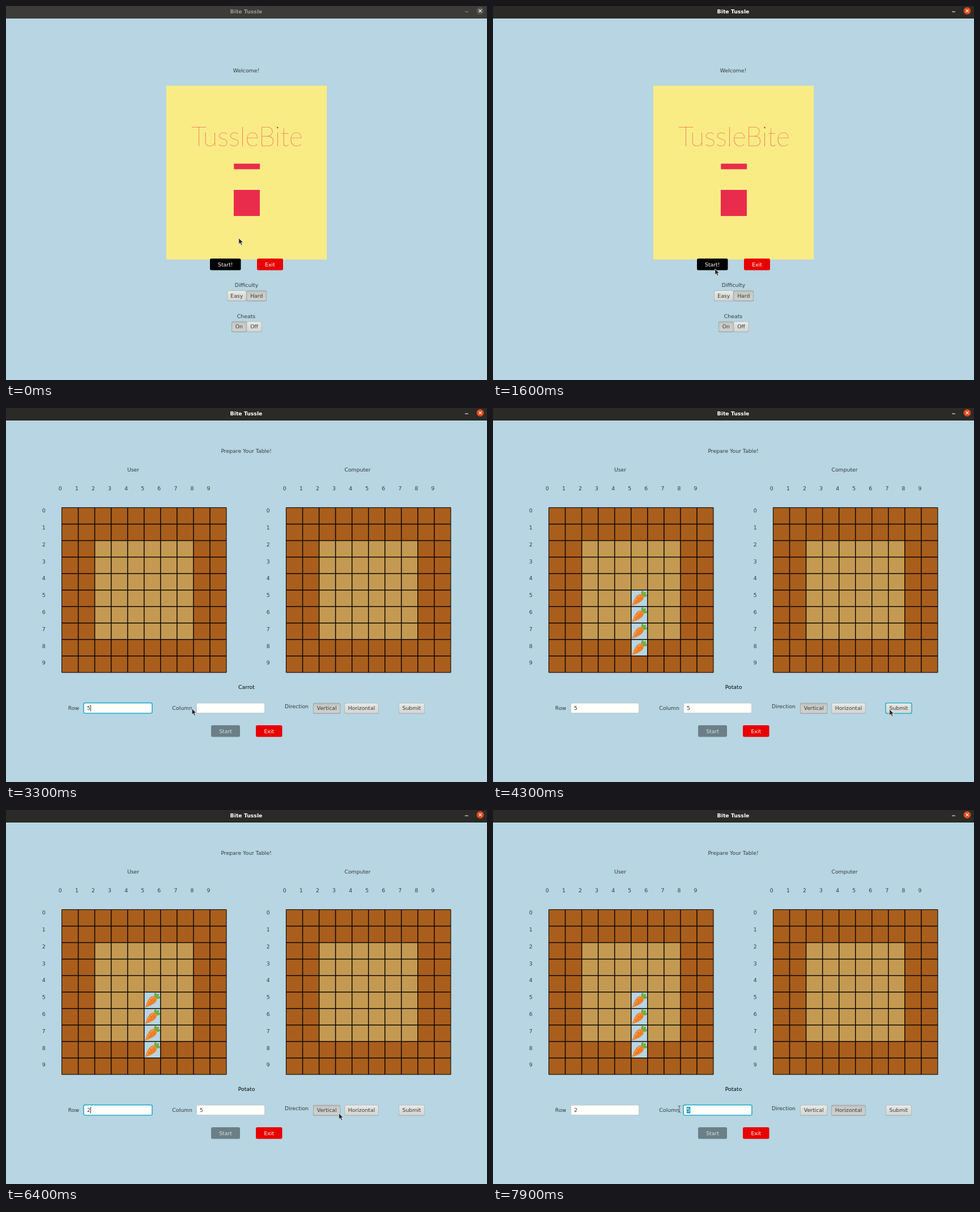
An HTML page with a canvas that plays this animation: 849 px wide and 659 px high, repeating every 8 s.

```html
<!DOCTYPE html>
<html lang="en">
<head>
<meta charset="utf-8">
<title>Bite Tussle</title>
<style>
html, body { margin: 0; width: 100%; height: 100%; overflow: hidden; background: #b7d5e2; }
canvas { display: block; }
</style>
</head>
<body>
<canvas id="stage" width="849" height="659"></canvas>
<script>
const ctx = document.getElementById('stage').getContext('2d');
const LOOP = 8000, STEP = 100;
const SKY = '#b7d5e2', INK = '#363a3c', PINK = '#ea2c4c', FOCUS = '#2cb0cf';
const FONT = "9.3px 'DejaVu Sans', sans-serif";

// Moments at which the state of the window changes
const TABLE = 1900, TYPE_ROW = 2900, TO_COLUMN = 3500, TYPE_COLUMN = 3700, SUBMIT = 4300,
      BACK_TO_ROW = 5000, RETYPE_ROW = 5400, HORIZONTAL = 6800, SELECT_COLUMN = 7600;

// Pointer route: time, x, y
const route = [
  [600, 410, 408], [800, 419, 452], [1000, 433, 508], [1200, 393, 471], [1300, 393, 471], [1600, 391, 462],
  [2100, 391, 462], [2400, 300, 510], [2600, 222, 528], [3100, 222, 528], [3400, 380, 529], [3700, 386, 530],
  [4000, 600, 538], [4200, 699, 530], [4500, 699, 530], [4900, 222, 530], [5200, 114, 528],
  [5500, 297, 528], [5800, 345, 532], [6300, 560, 534], [6600, 640, 532], [6800, 640, 532],
  [7100, 727, 529], [7300, 727, 529], [7600, 400, 530], [7900, 329, 527]
];

const mix = (a, b, p) => a + (b - a) * p;
const blend = (a, b, p) => `rgb(${a.map((v, i) => Math.round(mix(v, b[i], p)))})`;

function pointerAt(t) {
  const next = route.findIndex(k => k[0] > t);
  if (next === 0) return route[0].slice(1);
  if (next < 0) return route[route.length - 1].slice(1);
  const [t0, x0, y0] = route[next - 1], [t1, x1, y1] = route[next];
  const p = (t - t0) / (t1 - t0);
  return [mix(x0, x1, p), mix(y0, y1, p)];
}

function rect(x, y, w, h, fill) {
  ctx.fillStyle = fill;
  ctx.fillRect(x, y, w, h);
}

function box(x, y, w, h, r, fill) {
  ctx.beginPath();
  ctx.roundRect(x, y, w, h, r);
  ctx.fillStyle = fill;
  ctx.fill();
}

function shape(path, fill, stroke, width = 1) {
  const p = new Path2D(path);
  if (fill) { ctx.fillStyle = fill; ctx.fill(p); }
  if (stroke) { ctx.strokeStyle = stroke; ctx.lineWidth = width; ctx.stroke(p); }
}

function label(text, x, y, color = INK, align = 'center', font = FONT) {
  ctx.font = font;
  ctx.textAlign = align;
  ctx.fillStyle = color;
  ctx.fillText(text, x, y + 3.4);
}

function flatButton(text, x, y, w, fill, color = '#fff') {
  box(x, y, w, 20.5, 2.5, fill);
  label(text, x + w / 2, y + 10.2, color);
}

function button(text, x, y, w, { on = false, focus = false } = {}) {
  const h = 18.5, shade = ctx.createLinearGradient(0, y, 0, y + h);
  const stops = on ? ['#b4b6b3', '#c9cbc7', '#cfd0cc'] : ['#eeefeb', '#e2e3df', '#d5d6d2'];
  stops.forEach((c, i) => shade.addColorStop([0, 0.25, 1][i], c));
  if (focus) box(x - 0.8, y - 0.8, w + 1.6, h + 1.6, 3, FOCUS);
  else box(x, y, w, h + 0.5, 2.5, on ? '#96a0a4' : '#a9b4b8');
  box(x + 0.8, y + 0.8, w - 1.6, h - 1.6, 2, shade);
  label(text, x + w / 2, y + 9.1);
}

function field(text, x, focus, selected) {
  const y = 519.5, tx = x + 6.3;
  if (focus) box(x - 0.8, y - 0.8, 122.6, 19.8, 3, FOCUS);
  else box(x, y, 121, 18.4, 2.5, '#bfc9cc');
  box(x + 0.9, y + 0.9, 119.2, 16.6, 1.5, '#fffffc');
  if (selected) rect(tx - 0.5, 523, 6.5, 11.5, '#1d99bd');
  label(text, tx - 0.2, 529, selected ? '#fff' : INK, 'left');
  if (focus && !selected) rect(tx + (text ? 5.7 : 0), 523, 0.9, 11.5, '#222');
}

function titleBar(p) {
  rect(0, 0, 849, 22, blend([61, 60, 56], [43, 42, 38], p));
  rect(0, 21, 849, 1, blend([50, 49, 46], [33, 32, 29], p));
  const text = blend([152, 151, 145], [255, 255, 255], p);
  label('Bite Tussle', 424, 9.2, text, 'center', "bold 9.3px 'DejaVu Sans', sans-serif");
  rect(810, 9.6, 6, 1, text);
  ctx.beginPath();
  ctx.arc(837, 8.5, 6.5, 0, 7);
  ctx.fillStyle = blend([86, 85, 80], [222, 70, 26], p);
  ctx.fill();
  shape('M834.5 6l5 5m0-5l-5 5', null, '#f4f4f2', 1.1);
}

function wordmark(text, cx, cy, width) {
  const face = size => `100 ${size}px Lato, Inter, sans-serif`;
  ctx.font = face(60);
  const size = Math.min(60, 60 * width / ctx.measureText(text).width);
  ctx.font = face(size);
  ctx.textAlign = 'center';
  ctx.fillStyle = PINK;
  ctx.fillText(text, cx, cy + size * 0.36);
}

function welcome() {
  label('Welcome!', 424, 113.7);
  rect(282.8, 140.3, 283.4, 306.4, '#faec85');
  wordmark('TussleBite', 425.5, 230, 197);
  rect(402.3, 277.8, 45.8, 9.8, PINK);
  rect(402, 324, 46, 46, PINK);
  flatButton('Start!', 360, 445, 54.5, '#000');
  flatButton('Exit', 443, 445, 46, '#e80000');
  label('Difficulty', 424.5, 492);
  button('Easy', 390, 501.3, 34.5);
  button('Hard', 424.5, 501.3, 35.5, { on: true });
  label('Cheats', 424, 546.7);
  button('On', 398, 555.8, 26.5, { on: true });
  button('Off', 424.5, 555.8, 27);
}

const CELL = 29.05, GRID_Y = 175.5;

function board(name, x) {
  label(name, x + 126, 108.7);
  for (let i = 0; i < 10; i++) {
    label(i, x - 2.7 + i * 29.08, 141.3);
    label(i, x - 31.7, 181 + i * 29.77);
  }
  rect(x, GRID_Y, CELL * 10, CELL * 10, '#a95e1c');
  rect(x + CELL * 2, GRID_Y + CELL * 2, CELL * 6, CELL * 6, '#c49a52');
}

function gridLines(x) {
  for (let i = 0; i <= 10; i++) {
    const d = i * CELL, w = i % 10 ? 1.5 : 1.1;
    rect(x + d - w / 2, GRID_Y, w, CELL * 10, '#0b0704');
    rect(x, GRID_Y + d - w / 2, CELL * 10, w, '#0b0704');
  }
}

function carrot(x, y) {
  rect(x, y, CELL, CELL, SKY);
  ctx.save();
  ctx.translate(x, y);
  shape('M19 10C17 5 18 2 20 1.5C22 1 22 4 22 6C23 3 25 2 26 4C27 6 25 7 25 8C28 7 29 9 27.5 11C25 13 21 12 19 10Z', '#6da32f');
  shape('M19.5 10L20.5 4M20 10L25 5M20.5 10.5L26 10', null, '#93c04b', 0.9);
  shape('M1.6 27.4C4 20 8 10 14 7.5C18 6 23 10 22 14.5C21 20 9 25.5 1.6 27.4Z', '#f0822a');
  shape('M4 24.5C8 17 12 11 16 9', null, '#f9a75a', 1.3);
  shape('M10 13l3.5 2M6.5 19l3 1.6M14 20l-2.5-2M19.5 16l-3-2', null, '#cf6418', 0.8);
  ctx.restore();
}

function table(t) {
  const left = 98.5, right = 494.5, placed = t >= SUBMIT;
  const inRow = t < TO_COLUMN || (t >= BACK_TO_ROW && t < HORIZONTAL);
  const inColumn = (t >= TO_COLUMN && t < SUBMIT) || t >= SELECT_COLUMN;
  const flat = t >= HORIZONTAL;
  label('Prepare Your Table!', 424, 76);
  board('User', left);
  board('Computer', right);
  if (placed) for (let row = 5; row < 9; row++) carrot(left + 5 * CELL, GRID_Y + row * CELL);
  gridLines(left);
  gridLines(right);
  label(placed ? 'Potato' : 'Carrot', 424.5, 492, '#000');

  label('Row', 119.5, 529);
  field(t < TYPE_ROW ? '' : t < RETYPE_ROW ? '5' : '2', 137, inRow, t > BACK_TO_ROW && t < RETYPE_ROW);
  label('Column', 311, 529);
  field(t < TYPE_COLUMN ? '' : '5', 336, inColumn, t >= SELECT_COLUMN);
  label('Direction', 513, 525.4);
  button('Vertical', 542, 519.8, 48.3, { on: !flat });
  button('Horizontal', 597.3, 519.8, 60.4, { on: flat, focus: flat && t < SELECT_COLUMN });
  button('Submit', 693, 519.8, 46, { focus: placed && t < BACK_TO_ROW });
  flatButton('Start', 362, 559, 51, '#6c7f87', '#d3dfe4');
  flatButton('Exit', 441, 559, 46.5, '#e80000');
}

function pointer(t) {
  const [x, y] = pointerAt(t);
  const overField = y > 519 && y < 538 && ((x > 137 && x < 258) || (x > 336 && x < 457));
  const dragging = (t >= BACK_TO_ROW && t <= 5500) || t >= SELECT_COLUMN;
  ctx.save();
  ctx.translate(x, y);
  if (t >= TABLE && (overField || dragging)) {
    const beam = 'M-2.5-6Q0-6 0-4.5Q0-6 2.5-6M0-5V5M-2.5 6Q0 6 0 4.5Q0 6 2.5 6';
    shape(beam, null, 'rgba(255,255,255,.6)', 2.2);
    shape(beam, null, '#444', 1);
  } else {
    shape('M0.8 1V11.7L3.3 9.5L5.1 13.5L7.1 12.6L5.3 8.7H8.7Z', '#26252b', 'rgba(255,255,255,.75)', 0.9);
  }
  ctx.restore();
}

function draw(now) {
  const t = Math.floor((now % LOOP) / STEP) * STEP;
  rect(0, 0, 849, 659, SKY);
  titleBar(Math.min(1, Math.max(0, (t - 1300) / 300)));
  if (t < TABLE) welcome();
  else table(t);
  pointer(t);
}

const start = performance.now();
function tick() {
  draw(performance.now() - start);
  requestAnimationFrame(tick);
}
tick();
</script>
</body>
</html>
```
